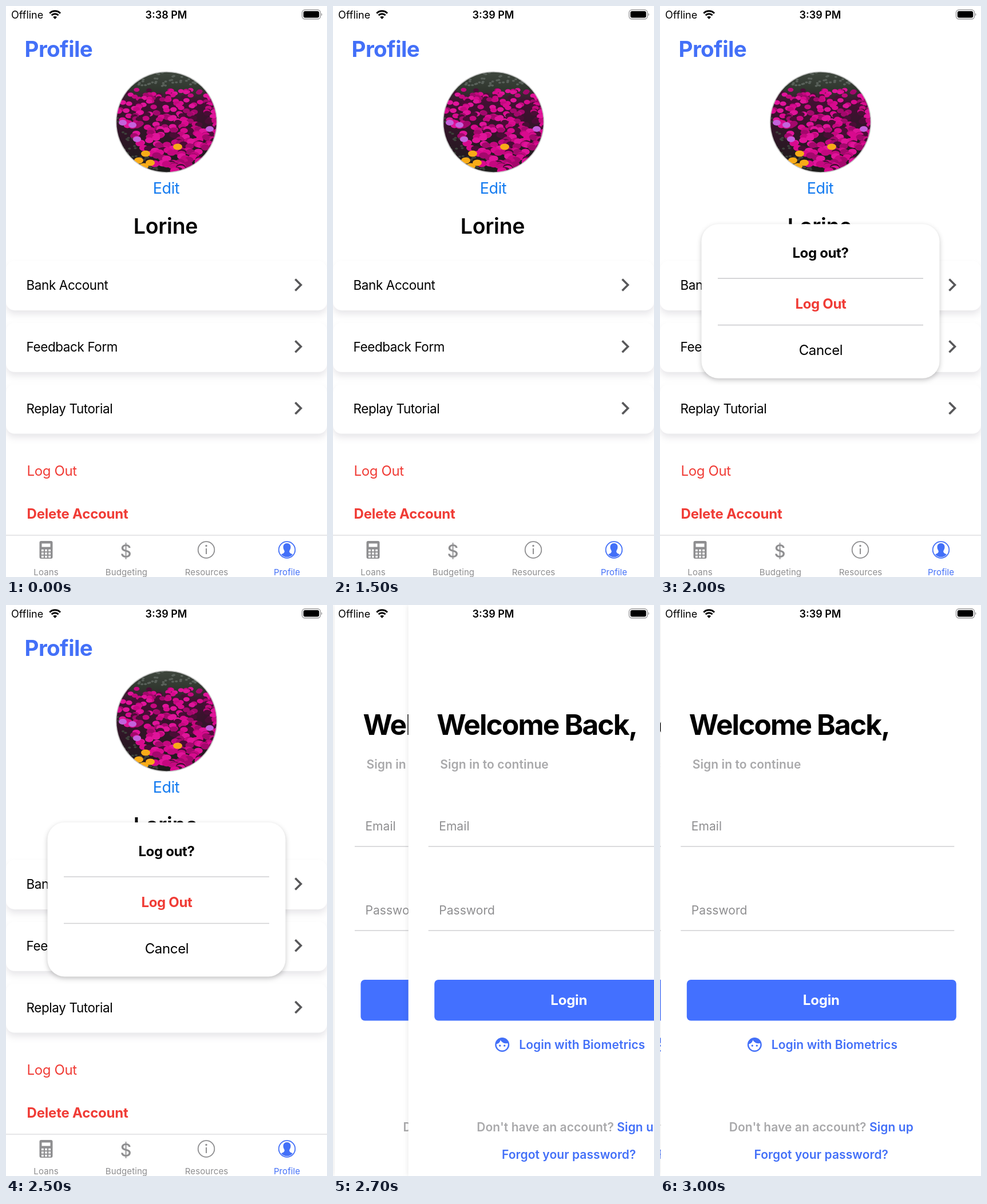
An HTML page for the animation above (3100 ms loop, 561x998 px).

```html
<!DOCTYPE html>
<html lang="en">
<head>
<meta charset="utf-8">
<title>Log out</title>
<style>
  html, body { margin: 0; width: 100%; height: 100%; overflow: hidden; background: #fff; }
  svg { display: block; width: 100%; height: 100%; }
  text { font: 400 22.4px Inter, "Liberation Sans", sans-serif; letter-spacing: -.35px; white-space: pre; }
  .mid { text-anchor: middle; }
  .bold { font-weight: 700; }
  .semi { font-weight: 600; }
  .blue { fill: #4370f8; }
  .red { fill: #f03c36; }
  .grey { fill: #8e8e90; }
  .pale { fill: #a9a9ab; }
  .line { fill: none; stroke: #d0d0d2; stroke-width: 1.7; }
  .chevron { fill: none; stroke: #58585a; stroke-width: 3.6; }
  .card { fill: #fff; filter: drop-shadow(0 7px 6px rgba(30, 20, 50, .1)); }
  .sheet { fill: #fff; filter: drop-shadow(0 0 5px rgba(0, 0, 0, .1)); }
  .dialog { fill: #fff; filter: drop-shadow(0 3px 4px rgba(0, 0, 0, .22)); }
  #status text { font-size: 18px; letter-spacing: 0; }
  #tabs text { font-size: 15px; letter-spacing: .1px; }
  #modal text, .action { font-size: 24px; letter-spacing: -.35px; }
  .action.bold { letter-spacing: -.2px; }
  #login text { font-size: 21px; letter-spacing: .07px; }
  #login .title { font-size: 49.5px; letter-spacing: -1.8px; }
  #login .button { font-size: 24px; letter-spacing: -.2px; }
</style>
</head>
<body>
<svg viewBox="0 0 561 998" preserveAspectRatio="none">
  <defs>
    <clipPath id="round"><circle cx="280.5" cy="203" r="88"/></clipPath>
    <linearGradient id="garden" x2="0" y2="1">
      <stop offset="0" stop-color="#40483f"/>
      <stop offset=".18" stop-color="#30362e"/>
      <stop offset=".3" stop-color="#421032"/>
      <stop offset="1" stop-color="#1b1c1a"/>
    </linearGradient>
    <g id="login">
      <rect class="sheet" width="561" height="998"/>
      <text class="title bold" x="49.5" y="227">Welcome Back,</text>
      <text class="semi pale" x="55.5" y="286">Sign in to continue</text>
      <text class="grey" x="53.5" y="394">Email</text>
      <text class="grey" x="53.5" y="541">Password</text>
      <path class="line" d="M35 422H513M35 569H513"/>
      <rect x="45.5" y="655" width="471" height="71.5" rx="7" fill="#4370ff"/>
      <text class="button bold mid" x="280.5" y="699" fill="#fff">Login</text>
      <g transform="translate(164 768.5)">
        <circle r="11.3" fill="none" stroke="#4370f8" stroke-width="2.4"/>
        <path class="blue" d="M-11.5-1C-7-1-4-4-3-8C0-3 5-1 11.5-3C9-14-9-14-11.5-1Z"/>
        <circle class="blue" cx="-4" cy="1.7" r="1.6"/>
        <circle class="blue" cx="4" cy="1.7" r="1.6"/>
      </g>
      <text class="semi blue" x="193.5" y="776">Login with Biometrics</text>
      <text class="semi pale mid" x="280.5" y="920">Don't have an account? <tspan class="blue">Sign up</tspan></text>
      <text class="semi blue mid" x="280.5" y="968">Forgot your password?</text>
    </g>
  </defs>

  <g id="profile">
    <text class="bold blue" x="32.6" y="89" style="font-size:38.5px;letter-spacing:-.6px">Profile</text>
    <g id="photo" clip-path="url(#round)">
      <rect x="192" y="114" width="178" height="178" fill="url(#garden)"/>
    </g>
    <circle cx="280.5" cy="203" r="88" fill="none" stroke="#c9c9c9" stroke-width="1.6"/>
    <text class="mid" x="280" y="328" fill="#147bf0" style="font-size:26.9px">Edit</text>
    <text class="semi mid" x="279" y="398" style="font-size:37.4px;letter-spacing:-.2px">Lorine</text>
    <g id="rows"></g>
    <text class="action red" x="36.5" y="821">Log Out</text>
    <text class="action bold red" x="36.5" y="896">Delete Account</text>
    <g id="tabs">
      <path d="M0 925H561" stroke="#dedee1" stroke-width="1.5"/>
      <rect class="grey" x="58.5" y="935" width="23" height="31" rx="3"/>
      <path d="M62.5 942.5H77.5" stroke="#fff" stroke-width="6"/>
      <path d="M62 951.5H78M62 957H78M62 962.5H78" stroke="#fff" stroke-width="3.4" stroke-dasharray="3.8 2.3"/>
      <text class="grey mid" x="209.5" y="963.5" style="font-size:31px;font-weight:500">$</text>
      <circle cx="350" cy="950.5" r="14.3" fill="none" stroke="#8e8e90" stroke-width="1.8"/>
      <path d="M350 948V958" stroke="#8e8e90" stroke-width="2"/>
      <circle class="grey" cx="350" cy="943.5" r="1.7"/>
      <circle cx="491" cy="950.5" r="14.3" fill="none" stroke="#4370f8" stroke-width="1.8"/>
      <path class="blue" d="M491 939C498 939 498.5 946 496.5 950C494 954 495 956 501 958.5A12.8 12.8 0 0 1 481 958.5C487 956 488 954 485.5 950C483.5 946 484 939 491 939Z"/>
      <text class="grey mid" x="70" y="994.5">Loans</text>
      <text class="grey mid" x="210.5" y="994.5">Budgeting</text>
      <text class="grey mid" x="350.5" y="994.5">Resources</text>
      <text class="blue mid" x="491" y="994.5">Profile</text>
    </g>
  </g>

  <g id="pages">
    <use id="lower" href="#login"/>
    <use id="upper" href="#login"/>
  </g>

  <g id="modal">
    <rect class="dialog" x="72.5" y="380" width="416" height="269.5" rx="30"/>
    <text class="bold mid" x="280.5" y="438.5">Log out?</text>
    <path class="line" d="M101 475H460M101 556.5H460"/>
    <text class="bold red mid" x="281" y="527.5">Log Out</text>
    <text class="mid" x="281" y="609">Cancel</text>
  </g>

  <g id="status">
    <text x="9" y="21.5">Offline</text>
    <g fill="none" stroke="#000" stroke-width="3">
      <path d="M76.3 12.7A13.2 13.2 0 0 1 95 12.7"/>
      <path d="M79.7 16.2A8.4 8.4 0 0 1 91.6 16.2"/>
    </g>
    <path d="M85.65 23L82.2 19.3A5 5 0 0 1 89.1 19.3Z"/>
    <text id="clock" class="semi mid" x="280" y="21.5"></text>
    <rect x="517.5" y="6.8" width="32" height="16" rx="4.8" fill="none" stroke="#98989a" stroke-width="1.4"/>
    <rect x="519.8" y="9" width="27.4" height="11.6" rx="3"/>
    <path d="M551 12.2Q554 14.8 551 17.4Z" fill="#98989a"/>
  </g>
</svg>

<script>
const LOOP = 3100, MINUTE = 700, OPEN = 1510, PUSH = 2550, CLOSE = 2563;
const WIDTH = 561, HEIGHT = 998, PARALLAX = .3;
const $ = id => document.getElementById(id);

// Remaining share of the way in a critically damped spring
const spring = ms => {
  const x = Math.max(0, ms) * .0184;
  return (1 + x) * Math.exp(-x);
};

const add = (parent, markup) => parent.insertAdjacentHTML('beforeend', markup);

function drawRows() {
  ['Bank Account', 'Feedback Form', 'Replay Tutorial'].forEach((label, i) => add($('rows'),
    `<g transform="translate(0 ${i * 107.8})">
      <rect class="card" y="446" width="561" height="86" rx="15"/>
      <text x="35.5" y="496">${label}</text>
      <path class="chevron" d="M505.5 477.5L515.5 487.5L505.5 497.5"/>
    </g>`));
}

function drawPhoto() {
  let seed = 7;
  const random = () => (seed = seed * 16807 % 2147483647) / 2147483647;
  const across = () => 190 + random() * 182;
  const blob = (x, y, r, fill) =>
    add($('photo'), `<ellipse cx="${x}" cy="${y}" rx="${r}" ry="${r * .7}" fill="${fill}"/>`);
  const pinks = ['#d80a8e', '#c4087f', '#e0149a', '#a3086c', '#4a0d36'];

  for (let i = 0; i < 360; i++) {
    const x = across(), y = 146 + i * .4;
    const inShade = x < 195 + (y - 190) * .75;
    if (inShade) blob(x, y, 2.5, '#3d423b');
    else blob(x, y, 5 + i * .01, pinks[i % 5]);
    if (i % 4 == 0) blob(across(), 114 + random() * 26, 2.5, '#59615a');
  }
  [[204, 204], [221, 208], [229, 233], [356, 215]].forEach(([x, y]) => blob(x, y, 7, '#c463dc'));
  [[244, 258], [232, 270], [252, 274], [241, 280], [300, 246]].forEach(([x, y]) => blob(x, y, 8, '#f8ab18'));
}

function show(id, visible) {
  $(id).style.display = visible ? '' : 'none';
}

function move(id, x, y) {
  $(id).setAttribute('transform', `translate(${x} ${y})`);
}

function frame() {
  const t = performance.now() % LOOP;
  $('clock').textContent = t < MINUTE ? '3:38 PM' : '3:39 PM';

  const pushed = t >= PUSH;
  const left = spring(t - PUSH);
  show('profile', !pushed);
  show('pages', pushed);
  // Two login pages enter together; the upper one pushes the lower aside
  move('upper', WIDTH * left, 0);
  move('lower', WIDTH * (left - PARALLAX * (1 - left)), 0);

  const drop = t < CLOSE ? spring(t - OPEN) : 1 - spring(t - CLOSE);
  show('modal', t > OPEN && drop < .65);
  move('modal', 0, HEIGHT * drop);

  requestAnimationFrame(frame);
}

drawRows();
drawPhoto();
frame();
</script>
</body>
</html>
```
